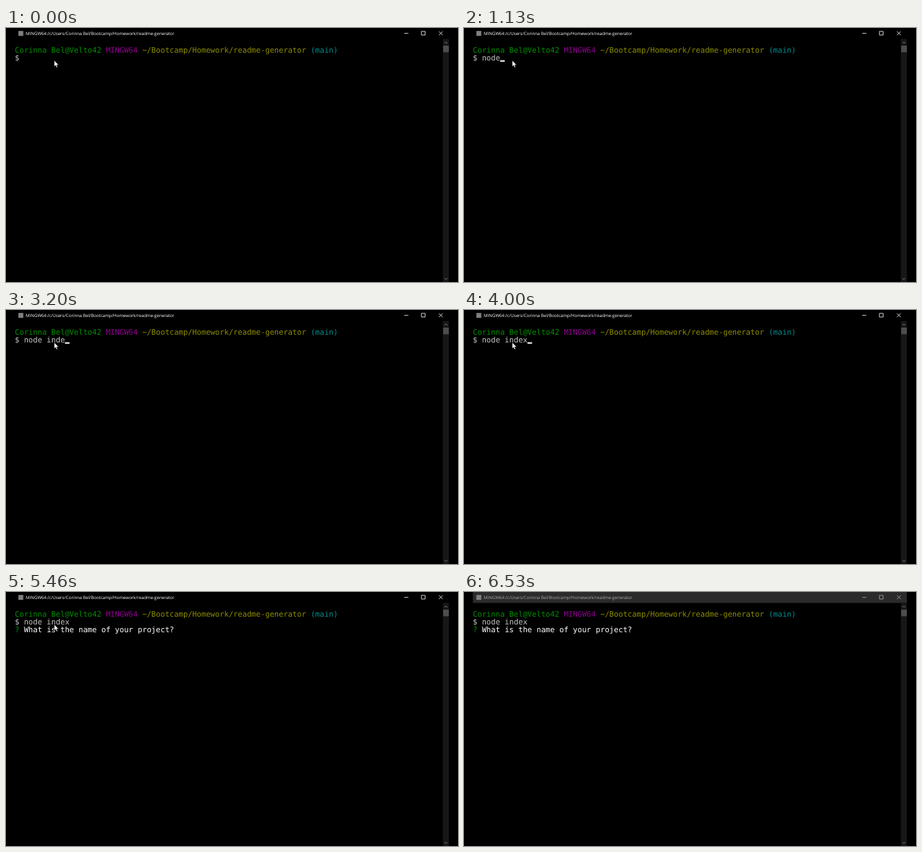
An HTML page for the animation above (6600 ms loop, 640 by 360 pixels).

```html
<!DOCTYPE html>
<html lang="en">
<head>
<meta charset="utf-8">
<title>Terminal</title>
<style>
  html, body { margin: 0; width: 100%; height: 100%; overflow: hidden; background: #000; }
  svg { display: block; width: 100vw; height: 100vh; }
  text { white-space: pre; text-rendering: geometricPrecision; }
  .mono { font: 10.71px "DejaVu Sans Mono", "Liberation Mono", monospace; fill: #c4c4c4; }
  .title { font: 6.16px "Open Sans", "Noto Sans", sans-serif; }
  .green { fill: #009000; }
  .magenta { fill: #900090; }
  .yellow { fill: #8e8e00; }
  .cyan { fill: #008e8e; }
  .bright { fill: #fff; }
</style>
</head>
<body>
<svg viewBox="0 0 640 360">
  <rect width="640" height="360"/>
  <rect id="bar" x="12.5" width="614.5" height="15.5" fill="#2b2b2b"/>
  <rect x="17.5" y="4.2" width="7" height="7" fill="#808080"/>
  <text id="title" class="title" x="28" y="10">MINGW64:/c/Users/Corinna Bel/Bootcamp/Homework/readme-generator</text>
  <path id="buttons" fill="none" stroke-width=".8" d="M564 7.6h5.6M588.2 4.8h5.2v5.2h-5.2zM613 4.8l5.4 5.4M618.4 4.8l-5.4 5.4"/>

  <rect x="618.5" y="15.5" width="8.5" height="344.5" fill="#171717"/>
  <rect x="619" y="25" width="8" height="9.4" fill="#4d4d4d"/>
  <path fill="none" stroke="#8a8a8a" stroke-width=".9" d="M620.9 21.8l2-2 2 2M620.9 354.5l2 2 2-2"/>

  <text class="mono" x="12.5" y="35.2"><tspan class="green">Corinna Bel@Velto42</tspan> <tspan class="magenta">MINGW64</tspan> <tspan class="yellow">~/Bootcamp/Homework/readme-generator</tspan> <tspan class="cyan">(main)</tspan></text>
  <text id="command" class="mono" x="12.5" y="46.2"></text>
  <text id="question" class="mono" x="12.5" y="56.8"><tspan class="green">?</tspan> <tspan class="bright">What is the name of your project?</tspan></text>
  <rect id="cursor" width="6.5" height="2.3"/>
  <path id="pointer" fill="#fff" stroke="#000" stroke-width=".6" d="M0 0V9L2 7.2 3.4 10.3 5 9.6 3.6 6.6H6.4Z"/>
</svg>
<script>
  const LOOP = 6600, CELL = 6.448, LEFT = 12.5;
  const $ = id => document.getElementById(id);
  const show = (el, on) => el.setAttribute("visibility", on ? "visible" : "hidden");
  const within = (t, [from, to]) => t >= from && t < to;

  const COMMAND = "node index";
  const keys = [660, 800, 930, 1060, 2060, 2460, 2600, 2730, 2860, 3860];
  const cursorOn = [[60, 1730], [2060, 4200], [4730, 5460], [6000, 6530]];
  const ENTER = 4730, ASK = 5060, LEAVE = 5660, GONE = 6000, BLUR = 6530;

  function drawCursor(t, typed) {
    const row = t < ENTER ? 0 : 1;
    const col = t < ENTER ? 2 + typed : t < ASK ? 0 : 36;
    const cursor = $("cursor");
    cursor.setAttribute("x", LEFT + col * CELL);
    cursor.setAttribute("y", 45.6 + row * 10.9);
    cursor.setAttribute("fill", t < ENTER ? "#e0e0e0" : "#fff");
    show(cursor, cursorOn.some(span => within(t, span)));
  }

  // The pointer rests, then leaves downwards in five speeding-up jumps.
  function drawPointer(t) {
    const step = t < LEAVE ? 0 : Math.min(5, 1 + Math.floor((t - LEAVE) / 68));
    const k = (step / 5) ** 1.6;
    $("pointer").setAttribute("transform", `translate(${68.2 - 39 * k} ${45.8 + 296 * k})`);
    show($("pointer"), t < GONE);
  }

  function draw(t) {
    const typed = keys.filter(at => t >= at).length;
    $("command").textContent = "$ " + COMMAND.slice(0, typed);
    show($("question"), t >= ASK);
    drawCursor(t, typed);
    drawPointer(t);

    const blurred = t >= BLUR;
    show($("bar"), blurred);
    $("title").setAttribute("fill", blurred ? "#aaa" : "#fff");
    $("buttons").setAttribute("stroke", blurred ? "#aaa" : "#fff");
  }

  const start = performance.now();
  function tick() {
    draw((performance.now() - start) % LOOP);
    requestAnimationFrame(tick);
  }
  tick();
</script>
</body>
</html>
```
